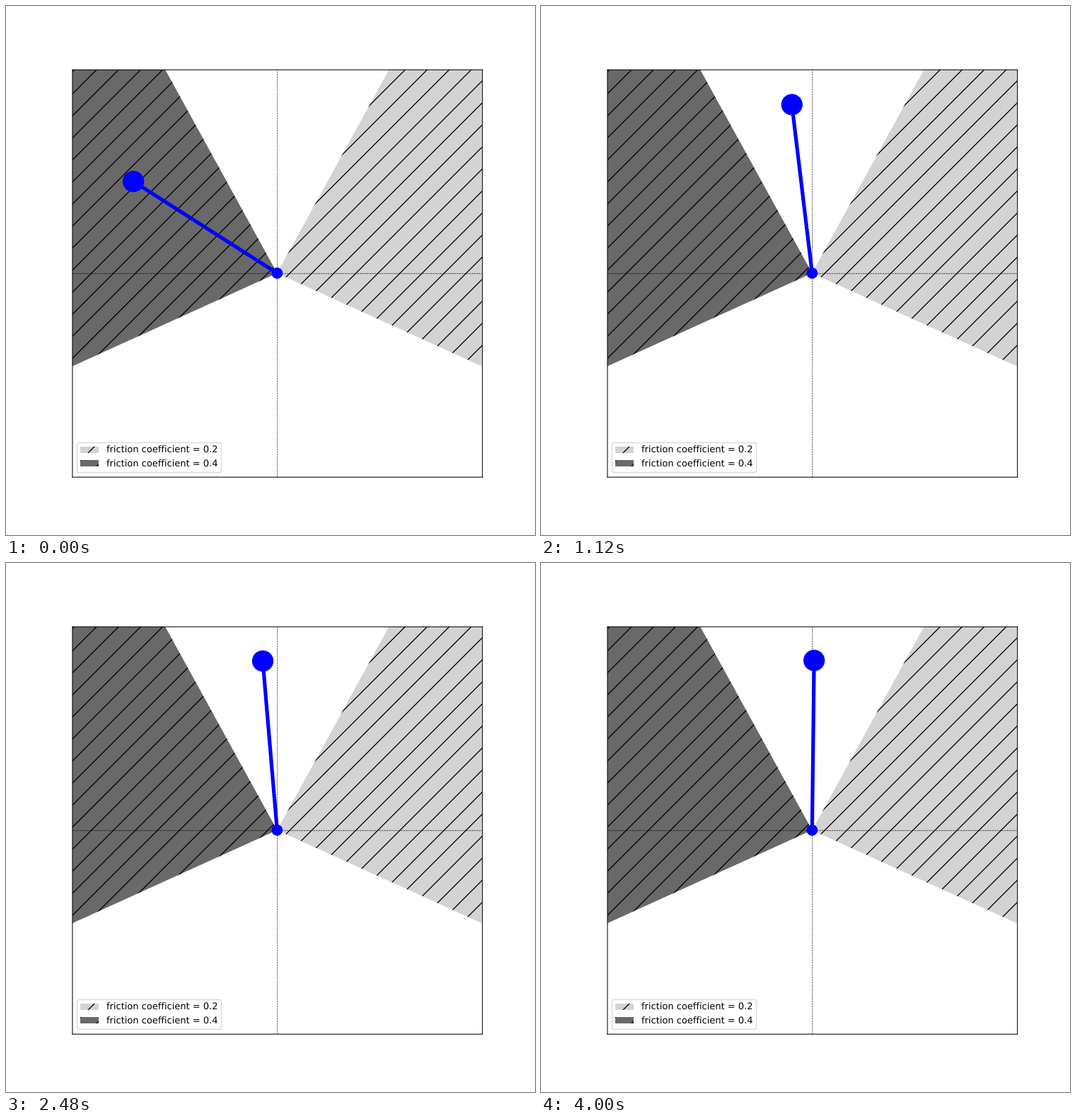
Animation, 748 px wide and 748 px high, one loop 4440 ms. Source, as a matplotlib script:

```python
import numpy as np
import matplotlib.pyplot as plt
from matplotlib.animation import FuncAnimation
from matplotlib.collections import LineCollection
from matplotlib.patches import Circle, Polygon
from matplotlib.transforms import ScaledTranslation

SIZE = 748
STEP_MS = 40
FRAMES = 111
LAST_STEP = 100  # the pendulum freezes here until the loop restarts
LIMIT = 1.2

# (step, angle from vertical) where the swing reverses
TURNS = [(0, -1.0), (38.7, 0.292), (64, -0.09), (88.5, 0.062), (113.5, -0.053)]


def rise(s, c=0.365):
    """Steady acceleration followed by a late, hard braking."""
    return s ** 2 * (1 + c * (1 - s ** (2 / c)))


def swing(s):
    return (1 - np.cos(np.pi * s)) / 2


def angle_at(step):
    step = min(step, LAST_STEP)
    for (t0, a0), (t1, a1) in zip(TURNS, TURNS[1:]):
        if step <= t1:
            ease = rise if t0 == 0 else swing
            return a0 + (a1 - a0) * ease((step - t0) / (t1 - t0))


def polar(angle, radius=1.0):
    return radius * np.sin(angle), radius * np.cos(angle)


def hatch(patch, zorder):
    """Diagonal lines in figure pixels, clipped to a patch."""
    ends = np.arange(1, 48) * SIZE / 24
    lines = LineCollection([[(x - SIZE, 0), (x, SIZE)] for x in ends],
                           colors="black", linewidths=1, zorder=zorder,
                           transform=None)
    ax.add_collection(lines, autolim=False)
    lines.set_clip_path(patch)


def friction_zone(side, color, mu):
    corners = [(0, 0), polar(side * 0.5, 3), polar(side * 2.0, 3)]
    zone = ax.add_patch(Polygon(corners, facecolor=color,
                                label=f"friction coefficient = {mu}"))
    hatch(zone, 1)


def soften(line):
    """Half-pixel shift without snapping to the pixel grid."""
    shift = ScaledTranslation(0.005, -0.005, fig.dpi_scale_trans)
    line.set(snap=False, transform=line.get_transform() + shift)


plt.rcParams.update({"font.family": "DejaVu Sans", "text.hinting": "none"})
fig, ax = plt.subplots(figsize=(8, 8), dpi=SIZE / 8)
ax.set(xlim=(-LIMIT, LIMIT), ylim=(-LIMIT, LIMIT), xticks=[], yticks=[])

friction_zone(1, "lightgray", 0.2)
friction_zone(-1, "dimgray", 0.4)
guides = [draw(0, color="black", lw=0.5, ls="--")
          for draw in (ax.axhline, ax.axvline)]
for line in [*guides, *ax.spines.values()]:
    soften(line)

legend = ax.legend(loc="lower left")
fig.canvas.draw()
for handle in legend.get_patches():
    hatch(handle, 6)

rod, = ax.plot([], [], color="blue", lw=4, zorder=3)
bob = ax.add_patch(Circle(polar(angle_at(0)), 0.06, color="blue", zorder=4))
ax.add_patch(Circle((0, 0), 0.03, color="blue", zorder=4))


def update(step):
    x, y = polar(angle_at(step))
    rod.set_data([0, x], [0, y])
    bob.center = x, y
    return rod, bob


anim = FuncAnimation(fig, update, frames=FRAMES, interval=STEP_MS,
                     repeat=True, repeat_delay=0)
plt.show()
```
